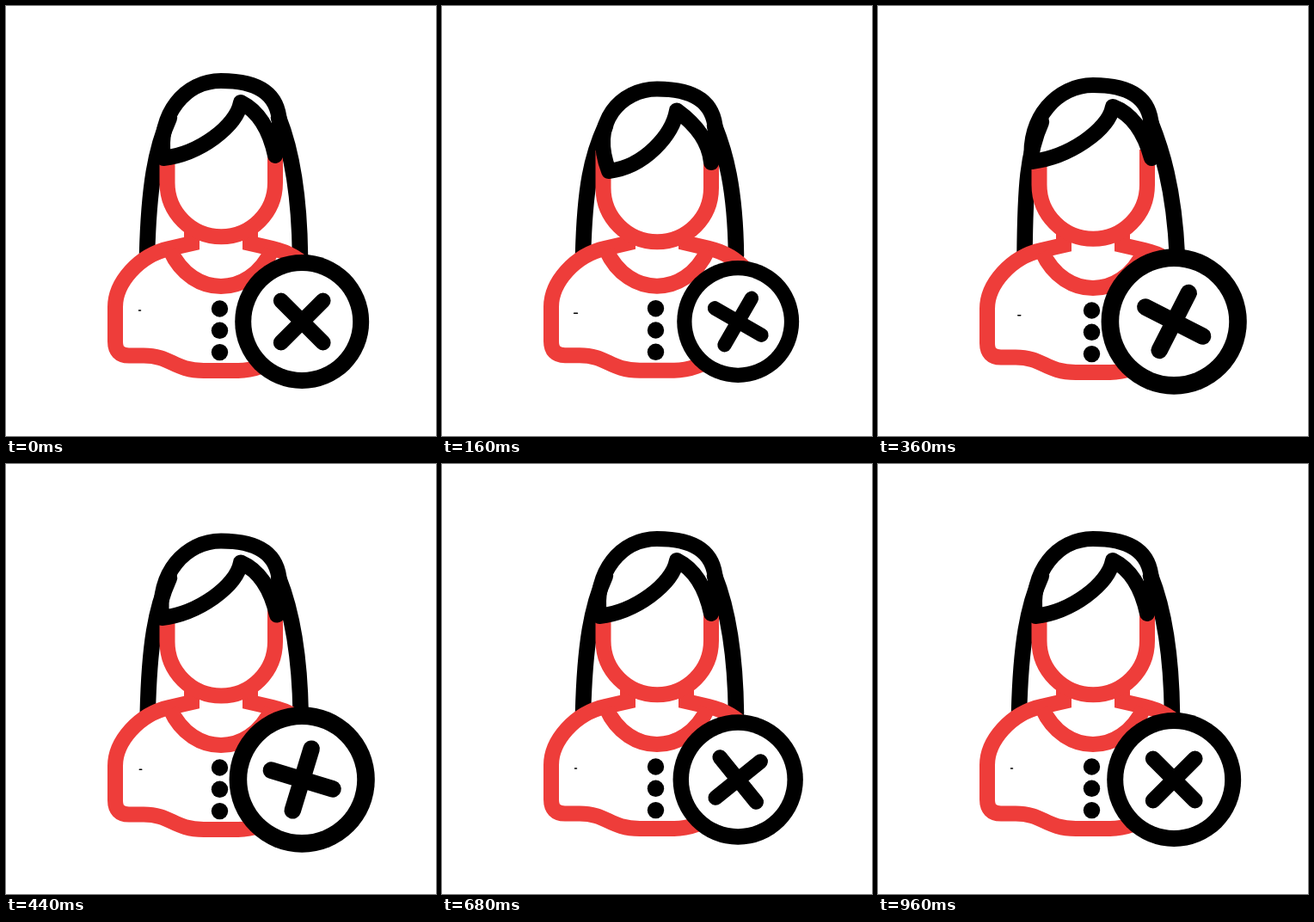
Write an HTML page with a canvas that moves like this. It is 500 by 500 pixels and loops after 1000 ms.

```html
<!DOCTYPE html>
<html lang="en">
<head>
<meta charset="utf-8">
<title>Remove user</title>
<style>
html, body { margin: 0; height: 100%; overflow: hidden; background: #fff; }
canvas { display: block; }
</style>
</head>
<body>
<canvas id="stage" width="500" height="500"></canvas>
<script>
const ctx = document.getElementById('stage').getContext('2d');
const RED = '#ee3d3a', BLACK = '#000', WHITE = '#fff';
const LOOP = 1000, STEP = 40;

// Smooth track through [time, value] points, without overshoot between them
function track(points) {
  const slope = i => (points[i + 1][1] - points[i][1]) / (points[i + 1][0] - points[i][0]);
  const tangent = i => {
    if (i === 0 || i === points.length - 1) return 0;
    const a = slope(i - 1), b = slope(i);
    return a * b > 0 ? 2 * a * b / (a + b) : 0;
  };
  return t => {
    const last = points.length - 1;
    if (t >= points[last][0]) return points[last][1];
    let i = 0;
    while (t >= points[i + 1][0]) i++;
    const [t0, v0] = points[i], [t1, v1] = points[i + 1];
    const d = t1 - t0, u = (t - t0) / d, w = 1 - u;
    return v0 * (1 + 2 * u) * w * w + v1 * (3 - 2 * u) * u * u
      + d * (tangent(i) * u * w * w - tangent(i + 1) * u * u * w);
  };
}

// Rest pose, squash, stretch, rebound, rest
const bounce = (rest, squash, stretch, rebound) =>
  track([[0, rest], [160, squash], [280, stretch], [360, rebound], [520, rest]]);

const pose = {
  hair: bounce(0, 9.5, -16, 5),
  face: bounce(0, 6, -9, 2.5),
  body: bounce(0, -0.3, -3.6, 2),
  leftX: bounce(183, 194, 178, 179),
  leftY: bounce(177, 192, 159, 181),
  rightX: bounce(313, 313, 320, 318),
  rightY: bounce(174, 182, 161, 177),
  bendX: bounce(30, 37, 24, 32),
  bendY: bounce(15, 27, 30, 12),
  cheekL: bounce(172, 168, 157, 177),
  cheekR: bounce(166, 164, 150, 167),
  swing: track([[0, 0], [160, 0], [280, -12], [360, 6.5], [520, -5], [680, 0]]),
  scale: track([[0, 1], [160, .91], [280, 1.01], [360, 1.085], [400, 1.1],
    [520, 1.035], [560, 1.03], [680, .97], [960, 1]]),
  angle: track([[0, 45], [160, 30], [280, -18], [360, -63], [440, -73],
    [520, -64], [680, -39], [960, -45]])
};

function line(d, color, width = 18, fill) {
  const path = new Path2D(d);
  if (fill) {
    ctx.fillStyle = fill;
    ctx.fill(path);
  }
  ctx.strokeStyle = color;
  ctx.lineWidth = width;
  ctx.stroke(path);
}

function disc(x, y, r, color) {
  ctx.fillStyle = color;
  ctx.beginPath();
  ctx.arc(x, y, r, 0, 2 * Math.PI);
  ctx.fill();
}

function drawStrands(p) {
  const { hair: h, swing: s } = p;
  ctx.lineCap = 'round';
  line(`M190 ${130 + h} C174 ${165 + h} ${166 + .8 * s} 210 ${164 + s} 290`, BLACK, 18.5);
  line(`M317 ${130 + h} C329 ${160 + h} ${341 + .5 * s} 210 ${342 + .9 * s} 290`, BLACK, 18.5);
}

function drawBody(p) {
  const neck = 256 + p.face - p.body;
  ctx.save();
  ctx.translate(0, p.body);
  ctx.lineCap = 'butt';
  ctx.lineJoin = 'miter';
  line(`M216 ${neck} V276 L190 282 C154 290 127 322 127 350 V390
    Q127 406.5 143 406.5 H160 C192 406.5 195 424 230 424 H270
    C295 424 310 412 335 400 L373 350 C373 322 346 290 310 282 L284 276 V${neck}`,
    RED, 18, WHITE);
  line('M191 284 C204 313 228 326 250 326 C272 326 296 313 309 284', RED);
  for (let i = 0; i < 3; i++) disc(248.5, 352 + 25.3 * i, 9.7, BLACK);
  ctx.restore();

  // Hair tip peeking out on the blouse
  const x = 155.5 + 1.35 * p.swing, y = 354 + .35 * p.hair + .6 * p.swing;
  const w = 1 + Math.abs(p.hair) / 10, tall = Math.max(0, -p.hair) / 4;
  line(`M${x - w} ${y - tall} L${x + w} ${y + tall}`, BLACK, 1.5);
}

function drawFace(p) {
  const y = 205.5 + p.face;
  ctx.lineCap = 'butt';
  line(`M187.5 ${p.cheekL} V${y} A62.5 62.5 0 0 0 313 ${y} V${p.cheekR}`, RED);
}

function drawHair(p) {
  const { hair: h, leftX, leftY } = p, tip = 112 + h;
  ctx.lineCap = ctx.lineJoin = 'round';
  line(`M318 ${135 + h} C316 ${100 + h} 290 ${87 + h} 250 ${87 + h}
    C209 ${87 + h} ${176 - h / 2} ${125 + h} ${leftX} ${leftY}
    C${leftX + 42} ${leftY - 5} 268 ${140 + h} 273 ${tip}
    Q${273 + p.bendX} ${tip + p.bendY} ${p.rightX} ${p.rightY}
    L321 ${157 + h} L318 ${135 + h}`, BLACK);
}

function drawBadge(p) {
  ctx.save();
  ctx.translate(344.2, 367);
  ctx.scale(p.scale, p.scale);
  disc(0, 0, 78, BLACK);
  disc(0, 0, 59, WHITE);
  ctx.rotate(p.angle * Math.PI / 180);
  line('M-34.5 0 H34.5 M0 -34.5 V34.5', BLACK);
  ctx.restore();
}

function frame(now) {
  const t = Math.floor(now % LOOP / STEP) * STEP;
  const p = {};
  for (const key in pose) p[key] = pose[key](t);
  ctx.fillStyle = WHITE;
  ctx.fillRect(0, 0, 500, 500);
  drawStrands(p);
  drawBody(p);
  drawFace(p);
  drawHair(p);
  drawBadge(p);
}

const start = performance.now();
function tick() {
  frame(performance.now() - start);
  requestAnimationFrame(tick);
}
tick();
</script>
</body>
</html>
```
